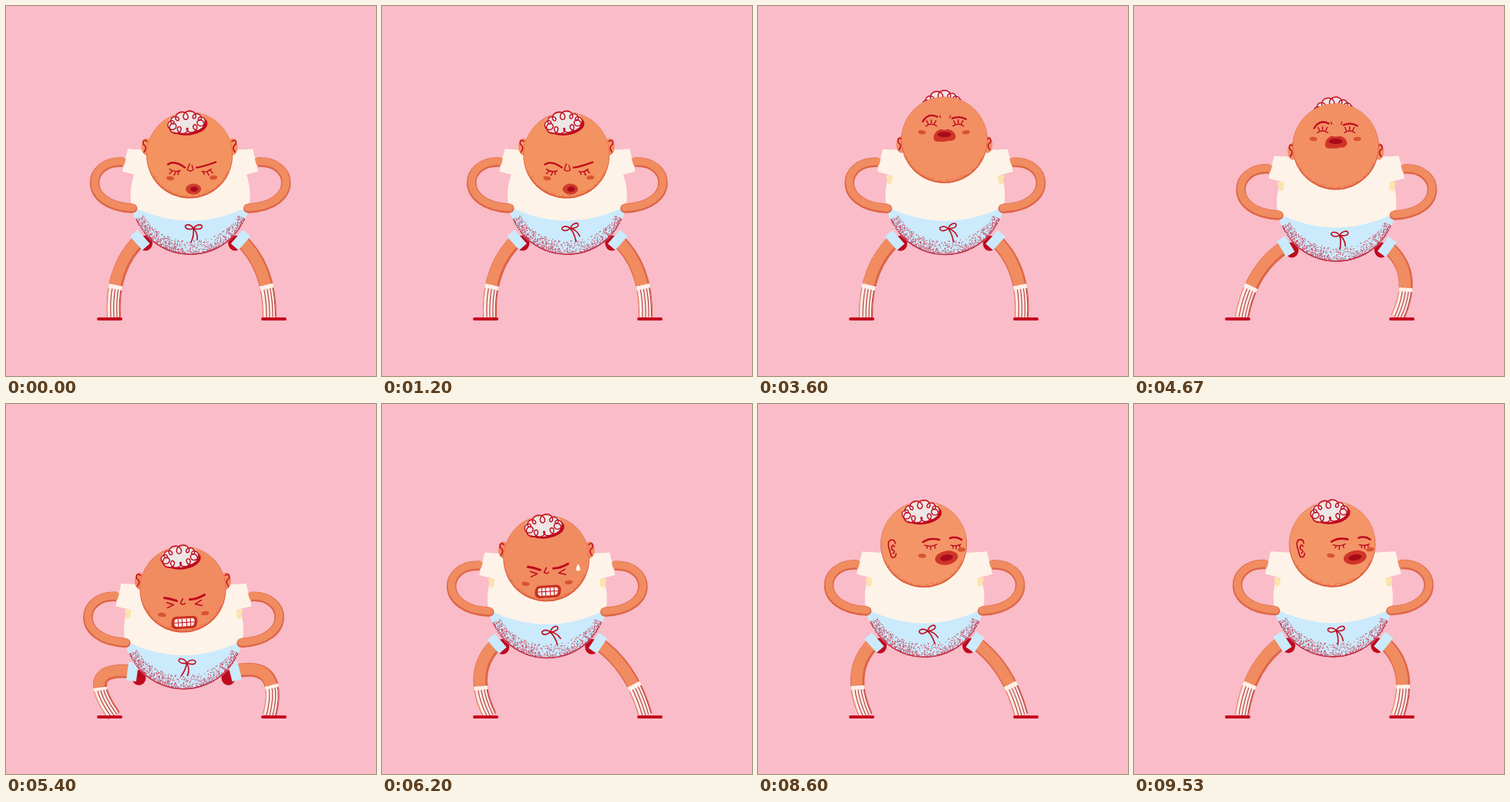
These frames come from a looping animation (480 px wide and 480 px high, 9.59 s). An HTML page with a canvas:

```html
<!DOCTYPE html>
<html>
<head>
<meta charset="utf-8">
<style>
html, body { margin: 0; height: 100%; overflow: hidden; background: #f9bcc8; }
canvas { display: block; }
</style>
</head>
<body>
<canvas id="stage" width="480" height="480"></canvas>
<script>
const ctx = document.getElementById('stage').getContext('2d');
const LOOP = 9590, STEP = LOOP / 144, TURN = 1206, TAU = Math.PI * 2;
const RED = '#bf0a1e', CREAM = '#fef3e8', BLUE = '#cbeafc', LIMB = '#f08c60', LIMB_DARK = '#de6547';
const SWITCHES = [2340, 4870, 7300];
const HEAD_Y = [-52, -72, -52.5, -69.5], HEAD_R = 56;
const SKIN = ['#f3935f', '#f29064', '#f18b60', '#f49567'];

let seed = 7;
const rand = () => (seed = seed * 16807 % 2147483647) / 2147483647;

// Grain that gets denser towards the lower rim of a disc
function grain(count, radius, depth) {
  return Array.from({ length: count }, () => {
    const a = Math.PI * (0.13 + 0.74 * rand());
    const r = radius - depth * rand() ** 2.6 * (0.3 + 0.7 * Math.sin(a));
    return [r * Math.cos(a), r * Math.sin(a)];
  });
}
const bodyGrain = grain(1100, 77, 18), headGrain = grain(260, HEAD_R - 0.5, 4);

const clamp = v => Math.max(0, Math.min(1, v));
const smooth = v => (v = clamp(v)) * v * (3 - 2 * v);
const mix = (a, b, k) => a + (b - a) * k;
const mixPoint = (p, q, k) => [mix(p[0], q[0], k), mix(p[1], q[1], k)];

function line(d, width, color, cap = 'round') {
  ctx.lineWidth = width;
  ctx.strokeStyle = color;
  ctx.lineCap = cap;
  ctx.lineJoin = 'round';
  ctx.stroke(new Path2D(d));
}
function fill(d, color) {
  ctx.fillStyle = color;
  ctx.fill(new Path2D(d));
}
function oval(x, y, rx, ry, color, tilt = 0) {
  ctx.beginPath();
  ctx.ellipse(x, y, rx, ry, tilt, 0, TAU);
  ctx.fillStyle = color;
  ctx.fill();
}
function dots(points, color) {
  ctx.fillStyle = color;
  for (const [x, y] of points) ctx.fillRect(x - 0.5, y - 0.5, 1, 1);
}
function at(x, y, draw, sx = 1, angle = 0) {
  ctx.save();
  ctx.translate(x, y);
  ctx.rotate(angle);
  ctx.scale(sx, 1);
  draw();
  ctx.restore();
}

function leg(bx, by, side) {
  const hip = [bx + side * 62, by + 55], foot = [241 + side * 101, 404];
  const dx = hip[0] - foot[0], dy = hip[1] - foot[1], dist = Math.hypot(dx, dy);
  const bend = Math.max(15, 22 + 0.95 * (112 - dist));
  const knee = [
    (hip[0] + foot[0]) / 2 - side * dy / dist * bend,
    (hip[1] + foot[1]) / 2 + side * dx / dist * bend - 7
  ];
  line(`M${hip}Q${knee} ${foot}`, 18, LIMB_DARK, 'butt');
  at(-1, -1, () => line(`M${hip}Q${knee} ${foot}`, 14.5, LIMB, 'butt'));

  const cut = 0.66;
  const ankle = mixPoint(knee, foot, cut), top = mixPoint(mixPoint(hip, knee, cut), ankle, cut);
  const len = Math.hypot(foot[0] - top[0], foot[1] - top[1]);
  const nx = -(foot[1] - top[1]) / len, ny = (foot[0] - top[0]) / len;
  const sock = `M${top}Q${ankle} ${foot}`;
  line(sock, 16, '#fbeae2', 'butt');
  for (const o of [-4, 0, 4, 7.5])
    at(-nx * o, -ny * o, () => line(sock, 1.1, '#b9353c', 'butt'));
  line(`M${top}L${mixPoint(top, ankle, 0.27)}`, 18, '#fff0e8', 'butt');
  line(`M${241 + side * 92} 406H${241 + side * 121}`, 4, '#c60b1f');

  oval(hip[0] - side * 4, hip[1] + 7, 9, 10, RED);
  const reach = Math.hypot(knee[0] - hip[0], knee[1] - hip[1]);
  const along = d => mixPoint(hip, knee, d / reach);
  line(`M${along(-2)}L${along(11)}`, 24, BLUE, 'butt');
}

function bow(angle) {
  at(0, 0, () => line('M0 0C-4 -7 -13 -5 -10 -1C-8 2 -3 1 0 0C4 -6 13 -6 11 -1C9 2 4 1 0 0', 1.6, RED), 1, angle / 2);
  at(0, 0, () => line('M0 0Q1 9 -3 18M0 0Q6 6 5 15', 1.6, RED), 1, angle);
}

function torso(wet, bowAngle) {
  for (const s of [-1, 1])
    at(0, 0, () => fill('M-81 -60L-88 -31L-64 -25L-44 -58Z', CREAM), s);
  ctx.save();
  ctx.beginPath();
  ctx.arc(0, 0, 77.5, 0, TAU);
  ctx.clip();
  ctx.fillStyle = CREAM;
  ctx.fillRect(-80, -80, 160, 160);
  fill('M-80 12Q0 54 80 12V80H-80Z', BLUE);
  line('M-56 55A78.5 78.5 0 0 0 56 55', 5, '#c3213a');
  dots(bodyGrain, '#c8394f');
  ctx.restore();
  if (wet) for (const s of [-1, 1])
    at(0, 0, () => fill('M-77 -26L-68 -27L-69 -16L-74 -14Z', '#fbe3ae'), s);
  at(4, 43, () => bow(bowAngle));
  for (const s of [-1, 1]) at(0, 0, () => {
    const arm = 'M-87 -43C-135 -46 -142 14 -75 17';
    line('M-75 17h.1', 12, LIMB_DARK);
    line(arm, 12.5, LIMB_DARK, 'butt');
    at(0, -1, () => line(arm + 'h.1', 9.5, LIMB));
    fill('M-80 -60L-88 -31L-66 -25L-60 -56Z', CREAM);
  }, s);
}

function hair() {
  at(-4, -42, () => {
    oval(3, 3.5, 24, 13, RED);
    oval(0, 0, 25, 13.5, '#eee6e5');
    ctx.beginPath();
    for (let i = 0; i <= 300; i++) {
      const a = i / 300 * TAU, r = 4.4 + 1.3 * Math.sin(3 * a);
      ctx.lineTo(20 * Math.cos(a) + r * Math.cos(11 * a), 10 * Math.sin(a) + r * Math.sin(11 * a));
    }
    ctx.lineWidth = 1.4;
    ctx.strokeStyle = RED;
    ctx.stroke();
  }, 1, -0.13);
}

function sideEar(x, y, side, color) {
  at(x, y, () => {
    oval(0, 0, 6.5, 11, color);
    line('M-1 -7Q5 -11 4 -3Q-2 0 3 7', 1.5, RED);
  }, side);
}

const cheeks = (x1, y1, x2, y2) => {
  oval(x1, y1, 5, 2.7, '#d9532f', 0.1);
  oval(x2, y2, 5, 2.7, '#d9532f', -0.1);
};
const drop = (x, y) => fill(`M${x} ${y - 5}Q${x + 6} ${y + 4} ${x} ${y + 4.5}Q${x - 5} ${y + 4} ${x} ${y - 5}`, '#fff4ee');

const faces = [
  () => {
    line('M-28 12Q-20 6 -6 16M9 16Q18 15 34 9', 2.3, RED);
    line('M-26 18Q-20 23 -12 20M-23 21l-3 3M-18 22l-2 4M-14 21l-1 4M16 21Q22 23 28 18M18 22l1 3M23 22l2 4M27 20l3 3', 1.4, RED);
    line('M0 11L-3 19Q1 22 5 19L3 13', 1.3, RED);
    cheeks(-25, 30, 31, 29);
    oval(5, 44, 10, 7, '#cf3d2b');
    oval(6, 44, 5, 3.4, '#a90b1c');
  },
  () => {
    line('M-28 -24Q-21 -36 -9 -30M10 -28Q20 -32 28 -27', 2.3, RED);
    line('M-6 -32l1 3M8 -32l-1 3', 1.2, RED);
    line('M-24 -18Q-17 -23 -10 -18M-21 -21l-2 -4M-17 -22v-4M-13 -21l2 -4M11 -18Q18 -23 25 -18M14 -21l-2 -4M18 -22v-4M22 -21l2 -4', 1.4, RED);
    cheeks(-29, -10, 28, -10);
    fill('M-14 -2Q-14 -11 -5 -14Q0 -12 5 -14Q14 -12 15 -4Q13 2 6 1Q0 3 -6 2Q-13 3 -14 -2Z', '#cf3528');
    oval(0, -7, 9, 3.5, '#a90b1c');
  },
  () => {
    line('M-24 11Q-16 12 -8 15M9 13Q18 13 28 7', 3, RED);
    line('M-21 17l9 3l-8 4M24 14l-8 5l9 2M0 12l-3 6q3 3 6 0', 1.5, RED);
    cheeks(-27, 33, 29, 31);
    at(2, 43, () => {
      fill('M-11 -8H12Q18 -7 17 0Q16 8 10 8H-12Q-18 7 -17 0Q-16 -8 -11 -8Z', '#c9301f');
      fill('M-10 -5H11Q14 -4 13 0Q12 5 9 5H-10Q-14 4 -13 0Q-13 -5 -10 -5Z', '#fff3ea');
      line('M-13 0H13M-8 -5V5M-3 -5V5M3 -5V5M8 -5V5', 1, RED, 'butt');
    }, 1, -0.06);
  },
  () => {
    line('M-1 -3Q8 -9 20 -6M34 -8Q42 -11 49 -6', 2.6, RED);
    line('M1 1Q9 4 17 0M5 2l-1 3M9 3v4M14 2l1 3M35 1Q42 3 48 0M38 2v3M42 2v4M46 1l1 3', 1.4, RED);
    cheeks(-2, 15, 49, 7);
    oval(29.5, 17.5, 15, 9, '#cf3528', -0.18);
    oval(29.5, 17.5, 8.5, 4, '#a90b1c', -0.18);
    line('M-37 -1C-38 -8 -46 -7 -46 0C-46 5 -44 7 -43 13C-42 19 -36 18 -36 12M-38 3C-40 -1 -43 3 -41 7Q-36 9 -40 12', 1.6, RED);
  }
];

function head(stage, t) {
  const skin = SKIN[stage], lookUp = stage === 1, turned = stage === 3;
  if (lookUp) at(0, -7, hair);
  if (!turned) for (const s of [-1, 1]) sideEar(s * 56, lookUp ? 6 : -11, s, skin);
  oval(0, 0, HEAD_R, HEAD_R, '#dc5136');
  oval(0, -0.9, HEAD_R - 0.6, HEAD_R - 1, skin);
  dots(headGrain, '#e06a45');
  if (!lookUp) hair();
  faces[stage]();
  if (stage === 2 && t > 5400) drop(41, 4 + (t - 5400) % TURN / 100);
  if (turned && t < 8200) drop(-18, -15 + (t - 7670) / 90);
}

// One puff of breath per turn, drifting off to the right
function puff(x, y, t) {
  const p = (t - 7540) % TURN / 760;
  if (t < 7540 || p > 1) return;
  const grow = Math.min(1, 0.45 + p * 3.2);
  ctx.save();
  ctx.globalAlpha = 1 - smooth((p - 0.65) / 0.35);
  ctx.translate(x + 44 + 135 * p, y + 15 - 14 * p);
  ctx.scale(grow, grow);
  for (let i = 0; i < 8; i++)
    oval(8 * Math.cos(i * TAU / 8), 11 * Math.sin(i * TAU / 8), 7.5, 7.5, '#c9e4f1');
  oval(-13, 2, 6, 6, '#c9e4f1');
  line('M-8 -8q4 -6 8 -1M3 -10q6 0 5 5M-6 1q4 -5 7 0M5 2q5 -1 4 5M-8 10q5 3 7 -2M2 12q5 2 7 -3', 1.2, '#8db9cf');
  ctx.restore();
}

function draw(t) {
  const turn = t / TURN * TAU - 0.05;
  const bx = 237.5 - 32.3 * Math.sin(turn), by = 269.5 - 24 * Math.cos(turn);
  const stage = SWITCHES.filter(s => t >= s).length;
  let hy = HEAD_Y[0];
  SWITCHES.forEach((s, i) => hy = mix(hy, HEAD_Y[i + 1], smooth((t - s + 95) / 190)));
  const bowAngle = -(8 + 32 * Math.cos(turn - 0.61)) * clamp(t / 500) * Math.PI / 180;

  ctx.fillStyle = '#f9bcc8';
  ctx.fillRect(0, 0, 480, 480);
  leg(bx, by, -1);
  leg(bx, by, 1);
  at(bx, by, () => torso(stage > 0, bowAngle));
  at(bx - 1, by + hy, () => head(stage, t));
  puff(bx, by + hy, t);
}

function frame(now) {
  draw(Math.floor((now % LOOP + 5) / STEP) % 144 * STEP);
  requestAnimationFrame(frame);
}
requestAnimationFrame(frame);
</script>
</body>
</html>
```
